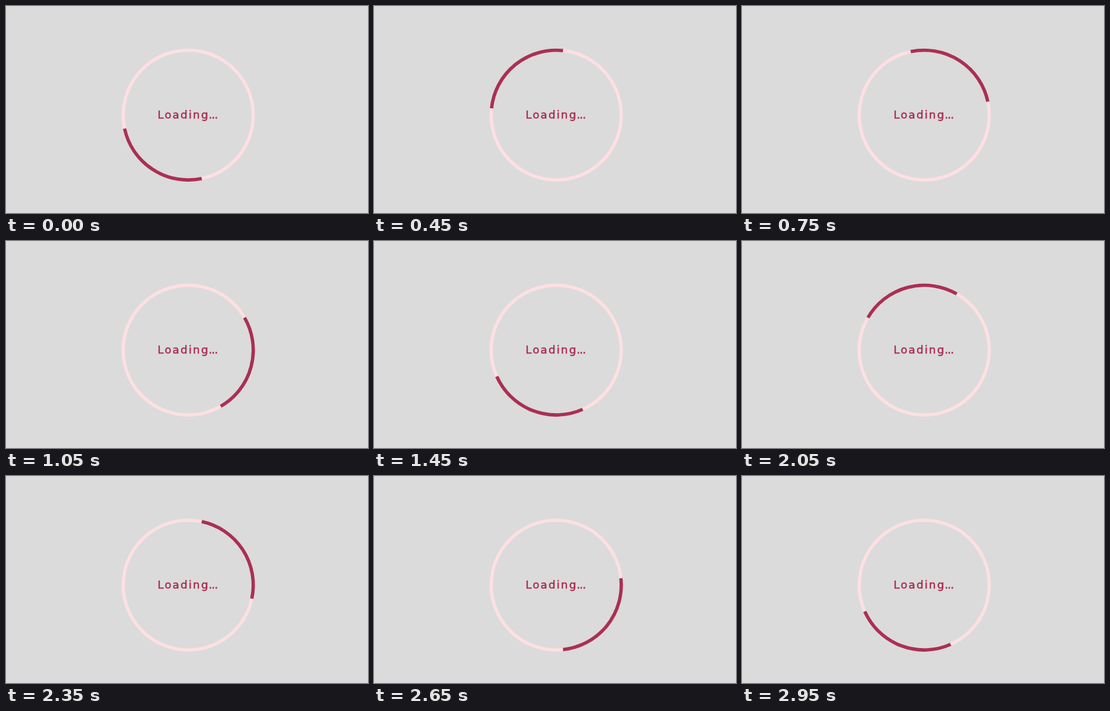
An HTML page that plays this animation: 600x344 px, repeating every 3000 ms.

```html
<!DOCTYPE html>
<html lang="en">
<head>
<meta charset="utf-8">
<title>Loading</title>
<style>
  html, body { margin: 0; width: 100%; height: 100%; overflow: hidden; background: #dbdbdb; }
  svg { display: block; width: 600px; height: 344px; }
  circle { fill: none; stroke: #fde0e2; stroke-width: 5.4; }
  #arc { stroke: #a93054; stroke-width: 5.6; stroke-dasharray: 90 270; }
  text {
    font: 18px "DejaVu Sans", sans-serif;
    letter-spacing: 2.1px;
    fill: #a93054;
    stroke: #a93054;
    stroke-width: .6;
  }
  .dots { letter-spacing: -.8px; }
</style>
</head>
<body>
<svg viewBox="0 0 600 344">
  <circle cx="302" cy="181.3" r="107.8"/>
  <circle id="arc" cx="302" cy="181.3" r="107.8" pathLength="360"/>
  <text x="251.2" y="187">Loading<tspan class="dots" dx="-1">...</tspan></text>
</svg>
<script>
  const arc = document.getElementById("arc");
  const STEP_MS = 50, STEP_DEG = 12, START_DEG = 78;
  const begin = performance.now();

  function draw() {
    const step = Math.floor(Math.max(0, performance.now() - begin) % 3000 / STEP_MS);
    const angle = START_DEG + step * STEP_DEG;
    arc.setAttribute("transform", `rotate(${angle} 302 181.3)`);
    requestAnimationFrame(draw);
  }
  draw();
</script>
</body>
</html>
```
